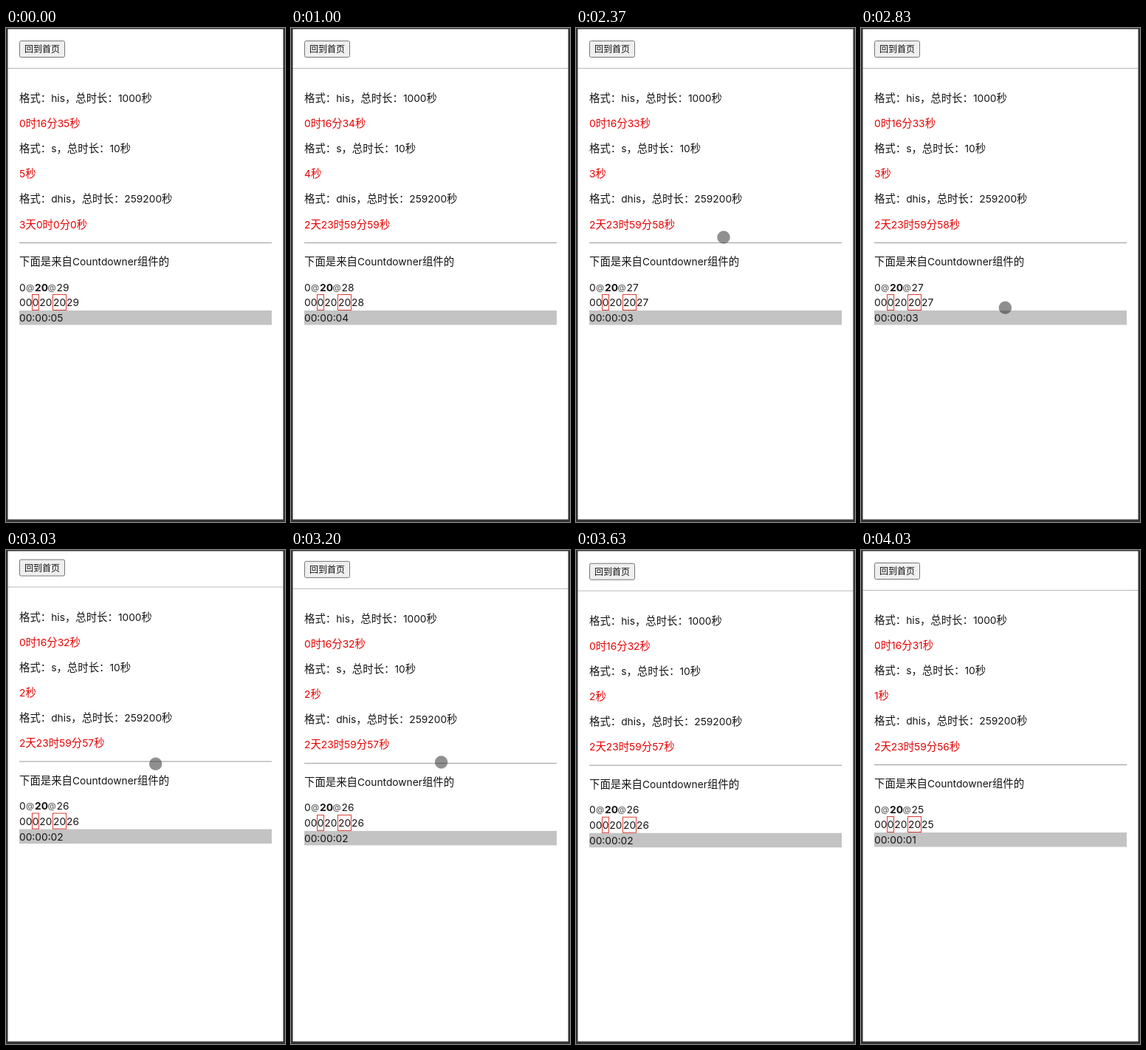
These frames come from a looping animation (378 px wide and 668 px high, 4710 ms). An HTML page:

```html
<!DOCTYPE html>
<html lang="zh-CN">
<head>
<meta charset="utf-8">
<style>
  html, body { margin: 0; width: 100%; height: 100%; overflow: hidden; background: #fff; }
  svg { display: block; width: 378px; height: 668px; }
  text { font: 13.75px Inter, "Noto Sans CJK SC", "Noto Sans CJK", sans-serif; fill: #151515; white-space: pre; }
  .han { font-size: 14.4px; font-family: "Noto Sans CJK SC", "Noto Sans CJK", sans-serif; font-weight: 350; }
  .red { fill: #e60000; }
  .at { font-size: 11.5px; fill: #444; }
  .bold { font-weight: 700; }
  .button { font: 350 12px "Noto Sans CJK SC", "Noto Sans CJK", sans-serif; }
  .outline { fill: none; stroke: #dc3c32; }
</style>
</head>
<body>
<svg viewBox="0 0 378 668">
  <rect width="378" height="668" fill="#fff"/>
  <g id="page">
    <rect x="18.5" y="17.5" width="61" height="22" rx="2" fill="#efefef" stroke="#767676"/>
    <text class="button" x="25" y="33">回到首页</text>
    <path d="M2 54.5H376" stroke="#b8b8b8"/>
    <path d="M18 290.5H360" stroke="#999"/>
    <rect x="18" y="382" width="342" height="19.5" fill="#c3c3c3"/>
    <rect class="outline" x="35.5" y="360.5" width="9" height="21"/>
    <rect class="outline" x="63.5" y="360.5" width="18" height="21"/>
    <g id="lines"></g>
  </g>
  <path id="arrow" d="M0 0V12L2.8 9.5L5 14L7 13L5 8.8H9Z" fill="#000" stroke="#fff" stroke-width=".8"/>
  <circle id="touch" r="8.5" fill="#222" fill-opacity=".5" stroke="#777" stroke-opacity=".35"/>
  <path d="M0 0H378V668H0ZM2.5 1.5V664.5H375.5V1.5Z" fill="#333335" fill-rule="evenodd"/>
</svg>
<script>
const LOOP = 4710, TICK = 1000, FIRST_TICK = 970;
const NS = 'http://www.w3.org/2000/svg';
const $ = id => document.getElementById(id);

function addText(x, y, cls = '') {
  const el = document.createElementNS(NS, 'text');
  el.setAttribute('x', x);
  el.setAttribute('y', y);
  el.setAttribute('class', cls);
  $('lines').append(el);
  return el;
}

// Chinese runs are set slightly larger than Latin runs.
function setText(el, value) {
  if (el.dataset.value === value) return;
  el.dataset.value = value;
  el.replaceChildren(...value.match(/[\u3000-\uffef]+|[^\u3000-\uffef]+/g).map(run => {
    const span = document.createElementNS(NS, 'tspan');
    if (run.charCodeAt(0) >= 0x3000) span.setAttribute('class', 'han');
    span.textContent = run;
    return span;
  }));
}

const fixed = (x, y, value, cls) => setText(addText(x, y, cls), value);
fixed(18, 100, '格式：his，总时长：1000秒');
fixed(18, 168, '格式：s，总时长：10秒');
fixed(18, 236, '格式：dhis，总时长：259200秒');
fixed(18, 321, '下面是来自Countdowner组件的');
fixed(18, 355.5, '0');
fixed(27, 354.5, '@', 'at');
fixed(39, 355.5, '20', 'bold');
fixed(56.5, 354.5, '@', 'at');
fixed(18, 376, '00');
fixed(35.7, 376, '0');
fixed(45.3, 376, '20');
fixed(64, 376, '20');

const hours = addText(18, 134, 'red');
const seconds = addText(18, 202, 'red');
const days = addText(18, 270.5, 'red');
const spun = addText(68.5, 355.5);
const boxed = addText(82, 376);
const clock = addText(18, 397);

const ease = p => p * p * (3 - 2 * p);
const progress = (t, from, to) => Math.min(1, Math.max(0, (t - from) / (to - from)));

// keys: [time, value, ...]
function track(t, keys) {
  let i = 0;
  while (i < keys.length - 2 && t >= keys[i + 1][0]) i++;
  const [from, ...a] = keys[i], [to, ...b] = keys[i + 1];
  const p = ease(progress(t, from, to));
  return a.map((v, k) => v + (b[k] - v) * p);
}

const scrollKeys = [[2840, 0], [3000, -4.5], [3060, -4.5], [3360, .7], [3640, .7], [3750, 23], [3900, 0]];
const touchKeys = [[2370, 200, 283], [2740, 195, 385], [2800, 195, 383], [3030, 202.7, 289.3],
                   [3400, 204.7, 284], [3530, 212, 285]];

function place(el, visible, x, y) {
  el.setAttribute('visibility', visible ? 'visible' : 'hidden');
  el.setAttribute('transform', `translate(${x} ${y})`);
}

function render(t) {
  const n = t < FIRST_TICK ? 0 : 1 + Math.floor((t - FIRST_TICK) / TICK);
  setText(hours, `0时16分${35 - n}秒`);
  setText(seconds, `${5 - n}秒`);
  setText(days, n ? `2天23时59分${60 - n}秒` : '3天0时0分0秒');
  setText(spun, `${29 - n}`);
  setText(boxed, `${29 - n}`);
  setText(clock, `00:00:0${5 - n}`);

  const [scroll] = track(t, scrollKeys);
  $('page').setAttribute('transform', `translate(0 ${scroll})`);

  const p = 1 - (1 - progress(t, 1390, 1830)) ** 2, q = 1 - p;
  const curve = (a, b, c) => a * q * q + 2 * b * p * q + c * p * p;
  place($('arrow'), t >= 1400 && t < 2000, curve(378, 270, 200), curve(224, 330, 275));
  place($('touch'), t >= 2000 && t < 3550, ...track(t, touchKeys));
}

const start = performance.now();
function frame() {
  render((performance.now() - start) % LOOP);
  requestAnimationFrame(frame);
}
frame();
</script>
</body>
</html>
```
